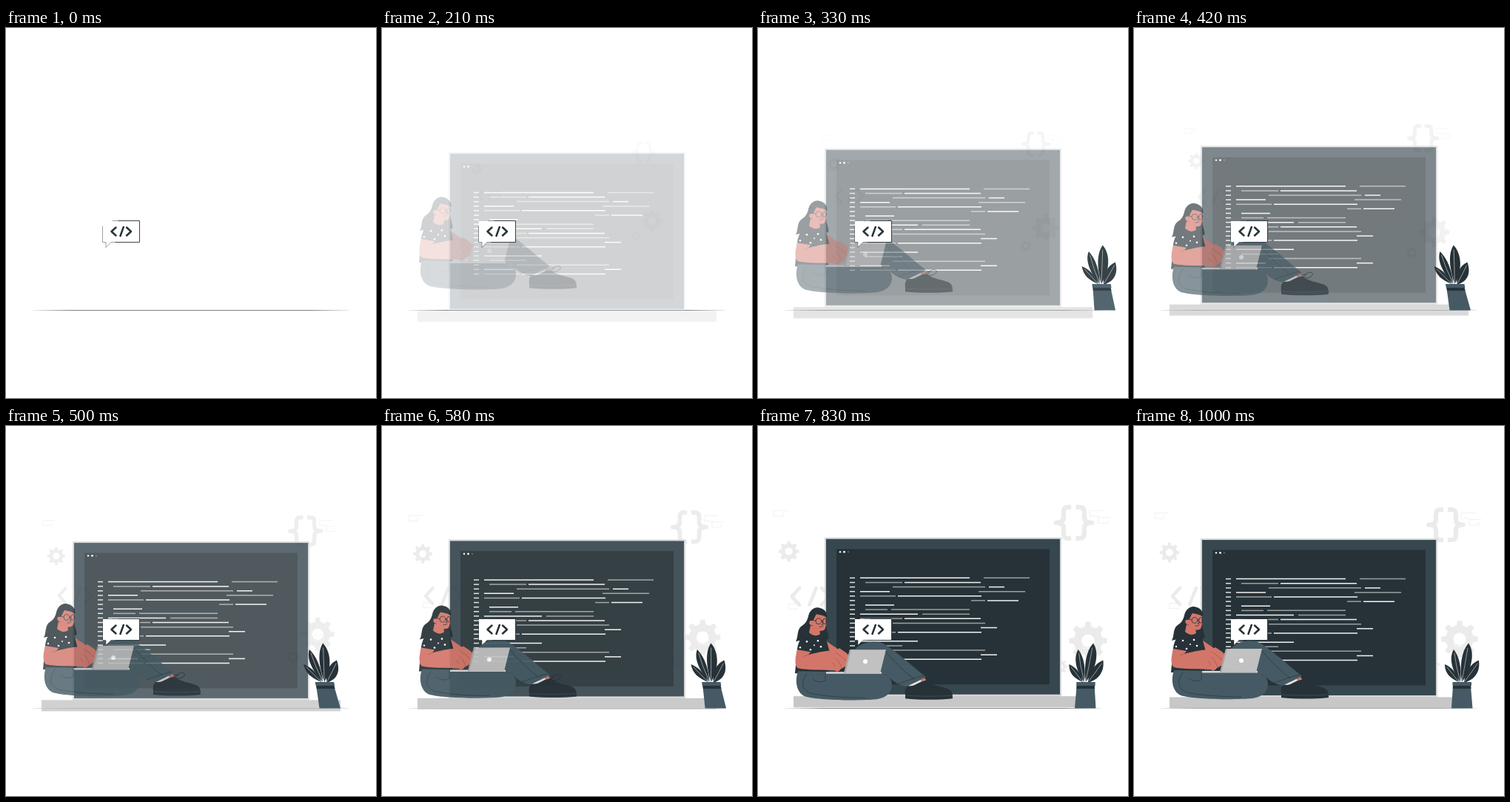
An HTML page that plays this animation: 500 px wide and 500 px high, repeating every 1040 ms.

```html
<!DOCTYPE html>
<html lang="en">
<head>
<meta charset="utf-8">
<title>Coding scene</title>
<style>
  html, body { margin: 0; width: 100%; height: 100%; overflow: hidden; background: #fff; }
  svg { display: block; width: 100vw; height: 100vh; }
  .line { fill: none; stroke-linecap: round; stroke-linejoin: round; }
  .dark { fill: #263238; }
  .slate { fill: #455a64; }
  .skin { fill: #d3766a; }
</style>
</head>
<body>
<svg viewBox="0 0 500 500">
  <defs>
    <linearGradient id="fade">
      <stop offset="0" stop-color="#263238" stop-opacity=".1"/>
      <stop offset=".12" stop-color="#263238" stop-opacity=".75"/>
      <stop offset=".88" stop-color="#263238" stop-opacity=".75"/>
      <stop offset="1" stop-color="#263238" stop-opacity=".1"/>
    </linearGradient>
  </defs>

  <g id="backdrop">
    <g class="line" stroke="#ebebeb">
      <path stroke-width="6" stroke-linecap="butt" d="M418 113H414Q408 113 408 119V126Q408 133.500 398 133.500Q408 133.500 408 141V148Q408 154 414 154H418M424 113H428Q435 113 435 119V126Q435 133.500 445 133.500Q435 133.500 435 141V148Q435 154 428 154H424"/>
      <path stroke-width="4.500" d="M62 219 52 230 62 241M84 219 75 241M91 219 101 230 91 241"/>
      <path stroke-width=".7" d="M47 117.500H28V125H41V121M461 117.500H442.500V125H454M469 126.500H453V134H466V130M62 239.500H48V246.500H60"/>
    </g>
    <g id="gears" fill="#ebebeb" fill-rule="evenodd"></g>
    <path class="line" stroke="#fafafa" stroke-width=".8" d="M434 289H448V298H434Z"/>
  </g>

  <rect x="36" y="381" width="428" height=".8" fill="url(#fade)"/>

  <g id="desk">
    <rect x="90" y="152" width="320" height="215" fill="#d5d5d5"/>
    <rect x="92" y="154" width="316" height="210" fill="#37474f"/>
    <rect x="106" y="167.500" width="288" height="183" class="dark"/>
    <g fill="#fff">
      <circle cx="111" cy="171.400" r="1.200"/>
      <circle cx="116.500" cy="171.400" r="1.400"/>
      <circle cx="122" cy="171.400" r="1.100" fill="#5b686e"/>
    </g>
    <g id="code" stroke-width="1.500"></g>
    <rect x="48" y="366.400" width="404" height="15.100" fill="#c7c7c7"/>
  </g>

  <g id="coder">
    <!-- far leg and shoe -->
    <path fill="#e8e4e2" d="M200 348 223 339 227 342 206 352Z"/>
    <path class="skin" d="M219 341 225 339 227 342 221 344Z"/>
    <path class="slate" d="M128 304C136 293 150 288 165 291C178 295 208 323 227 338C218 343 208 347 201 351C190 349 181 343 173 335L125 335Z"/>
    <path class="line" stroke="#263238" stroke-width=".6" d="M172 303Q192 326 211 341M190 347Q211 339 224 336"/>
    <path class="dark" d="M199 362C198 354 200 349 206 350C213 350 219 343 227 343C235 349 248 351 257 354C263 357 263 362 263 367C245 369 218 369 199 367Z"/>
    <path class="line" stroke="#263238" d="M229 345C232 335 243 336 241 341Q238 346 230 345Q223 340 233 340"/>
    <path class="line" stroke="#546168" stroke-width=".5" d="M200 363Q230 365 262 363"/>

    <!-- hair and torso -->
    <path class="dark" d="M76 246C65 253 70 263 59 269C52 274 55 283 51 290C58 287 66 290 73 287L95 287C97 281 91 275 92 262C92 249 83 243 76 246Z"/>
    <path class="skin" d="M90 288C97 293 104 297 109 301L101 311 88 304Z"/>
    <path class="dark" d="M70 277C62 280 55 286 53 300L50 333H95L97 305 92 286 85 279Z"/>
    <path class="skin" d="M71 268 69 278Q77 285 84 280L83 273Z"/>
    <path class="skin" d="M73 257C76 252 89 250 91 255C92 261 93 268 90 274C84 278 77 274 73 268C68 268 68 261 73 261Z"/>
    <path class="dark" d="M68 264C66 251 73 244 81 244C90 245 95 252 93 258C89 254 83 254 79 253C76 257 76 262 72 262Q69 261 68 264Z"/>
    <g class="line" stroke="#263238" stroke-width=".8">
      <circle cx="82" cy="262.500" r="4"/>
      <ellipse cx="90" cy="262.500" rx="2.400" ry="3.700"/>
      <path d="M73 261 78 262M86 262H88M83 270Q86 271 88 269M87 263 88 267 86 267"/>
    </g>
    <g fill="#fff">
      <circle cx="66" cy="290" r="1.300"/><circle cx="81" cy="289" r="1.300"/>
      <circle cx="71" cy="301" r="1.300"/><circle cx="85" cy="297" r="1.300"/>
      <circle cx="57" cy="298" r="1.200"/><circle cx="76" cy="295" r="1"/>
    </g>

    <!-- seated leg -->
    <path class="slate" d="M54 330C50 342 51 358 63 364C83 370 140 370 160 368C176 366 184 355 180 343C177 335 168 332 150 332Z"/>
    <path class="line" stroke="#263238" stroke-width=".6" d="M66 333C58 345 58 354 71 360Q100 366 145 366M91 333V343Q82 347 74 341"/>

    <!-- laptop and near arm -->
    <path fill="#d9d9d9" d="M92 331H167V333.500H92Z"/>
    <path class="skin" d="M53 301C50 312 49 323 54 326C66 329 88 328 104 329C107 332 110 330 112 327C117 325 121 322 123 318L121 315 125 311 119 305 110 299 105 302C95 302 82 304 68 308L71 304Z"/>
    <path class="line" stroke="#9f4e45" stroke-width=".6" d="M68 308 62 310M105 305 112 310 119 316M104 312 109 317 113 325M101 318 104 323"/>
    <path fill="#c1c1c1" d="M124 301H173L165 333H116Z"/>
    <path fill="#a6a6a6" d="M124 301H126L118 333H116Z"/>
    <circle cx="145" cy="317" r="3" fill="#fff"/>
  </g>

  <g id="bubble">
    <path fill="#fff" d="M131 261H180.500V289.500H142L135 296V289.500H131Z"/>
    <g class="line" stroke="#263238" stroke-width=".9">
      <path d="M152 260.500H180.500V289.500H148"/>
      <path stroke-opacity=".5" d="M144 260.500H152M148 289.500H142L135 296.500V289.500H130.500V268"/>
      <path stroke-width="2.500" d="M148.500 269.500 142.500 275 148.500 280.500M158.800 269 154.500 281M163 269.500 169 275 163 280.500"/>
    </g>
  </g>

  <g id="plant">
    <g class="dark">
      <path d="M443 346C440 325 442 305 452 293.500C461 306 457 328 443 346Z"/>
      <path d="M441 346C430 331 425 314 432 302C440 312 443 328 441 346Z"/>
      <path d="M439 346C427 341 420 334 420 322C430 326 437 335 439 346Z"/>
      <path d="M446 347C447 332 455 321 466 316.500C468 331 462 342 446 347Z"/>
    </g>
    <path class="line" stroke="#fff" stroke-width=".5" d="M443 345Q447 325 451 300M441 345Q435 325 433 307M438 345Q430 334 423 326M447 345Q456 333 464 321"/>
    <path class="slate" d="M430.500 346H456V351H455L457.500 381.500H429L431 351H430.500Z"/>
    <path class="dark" d="M431 351H455.200L455.500 355H430.800Z"/>
  </g>
</svg>
<script>
  const el = id => document.getElementById(id);
  const mix = (a, b, p) => a + (b - a) * p;

  function gear(cx, cy, r, hole) {
    const pts = [];
    for (let i = 0; i < 8; i++) {
      for (const [turn, size] of [[-.28, .76], [-.17, 1], [.17, 1], [.28, .76]]) {
        const a = (i + turn) * Math.PI / 4;
        pts.push((cx + r * size * Math.cos(a)).toFixed(2) + ' ' + (cy + r * size * Math.sin(a)).toFixed(2));
      }
    }
    return `<path d="M${pts.join('L')}ZM${cx - hole} ${cy}a${hole} ${hole} 0 1 0 ${2 * hole} 0a${hole} ${hole} 0 1 0 ${-2 * hole} 0Z"/>`;
  }
  el('gears').innerHTML = gear(48, 171, 13.5, 5) + gear(440, 288, 25, 8.5) + gear(403, 322, 10, 4);

  // Each row: start-end spans, "~" marks a dimmed one.
  const rows = `138-286 ~305-367|~145-195 198-301|~182-307 312-333|138-178 ~298-361|~138-186 189-302
    |~288-307 310-352|145-184|~145-175 ~180-286|138-216 ~222-286|~138-195 198-301|~182-307|301-323
    |~138-186 189-302||138-216|~145-195|~182-307|138-178 301-323|~138-186 189-302`.split('|');
  const dash = (a, b, y, color) => `<path stroke="${color}" d="M${a} ${y}H${b}"/>`;
  el('code').innerHTML = rows.map((row, i) => {
    const y = (206.6 + i * 6.11).toFixed(2);
    const spans = row.trim().split(' ').filter(Boolean).map(span => {
      const [a, b] = span.replace('~', '').split('-');
      return dash(a, b, y, span[0] === '~' ? '#9b9f9f' : '#f2f2f2');
    });
    return dash(124, 131, y, '#dfe2e2') + spans.join('');
  }).join('');

  // cubic-bezier(.36, -.01, .5, 1.38)
  function ease(x) {
    if (x <= 0) return 0;
    if (x >= 1) return 1;
    const curve = (a, b, s) => 3 * (1 - s) * (1 - s) * s * a + 3 * (1 - s) * s * s * b + s * s * s;
    let lo = 0, hi = 1;
    for (let i = 0; i < 24; i++) {
      const mid = (lo + hi) / 2;
      if (curve(.36, .5, mid) < x) lo = mid; else hi = mid;
    }
    return curve(-.01, 1.38, lo);
  }

  function pose(id, transform, opacity) {
    el(id).setAttribute('transform', transform);
    el(id).setAttribute('opacity', Math.max(0, Math.min(1, opacity)));
  }

  function swingPlant(u) {
    const lean = [-.364, .176, -.035, 0];
    const part = u < .6 ? 0 : u < .8 ? 1 : 2;
    const p = ease(part ? (u - .4 - part * .2) / .2 : u / .6);
    const skew = mix(lean[part], lean[part + 1], p);
    const shift = part ? 0 : 250 * (1 - p);
    pose('plant', `matrix(1 0 ${skew} 1 ${shift - skew * 337} 0)`, part ? 1 : p);
  }

  const LOOP = 1040, STEP = 1000 / 24;
  const start = performance.now();

  function draw() {
    const t = (performance.now() - start) % LOOP;
    const tick = Math.floor((t + 5) / STEP);
    const u = tick < 2 ? 0 : Math.min(1, tick / 24 + .032);
    const p = ease(u), scale = .5 + p / 2;
    pose('backdrop', `translate(250 220) scale(${scale}) translate(-250 -220)`, p);
    pose('desk', `translate(0 ${20 * (1 - p)})`, p);
    pose('coder', `translate(0 ${-20 * (1 - p)})`, p);
    swingPlant(u);
    requestAnimationFrame(draw);
  }
  draw();
</script>
</body>
</html>
```
